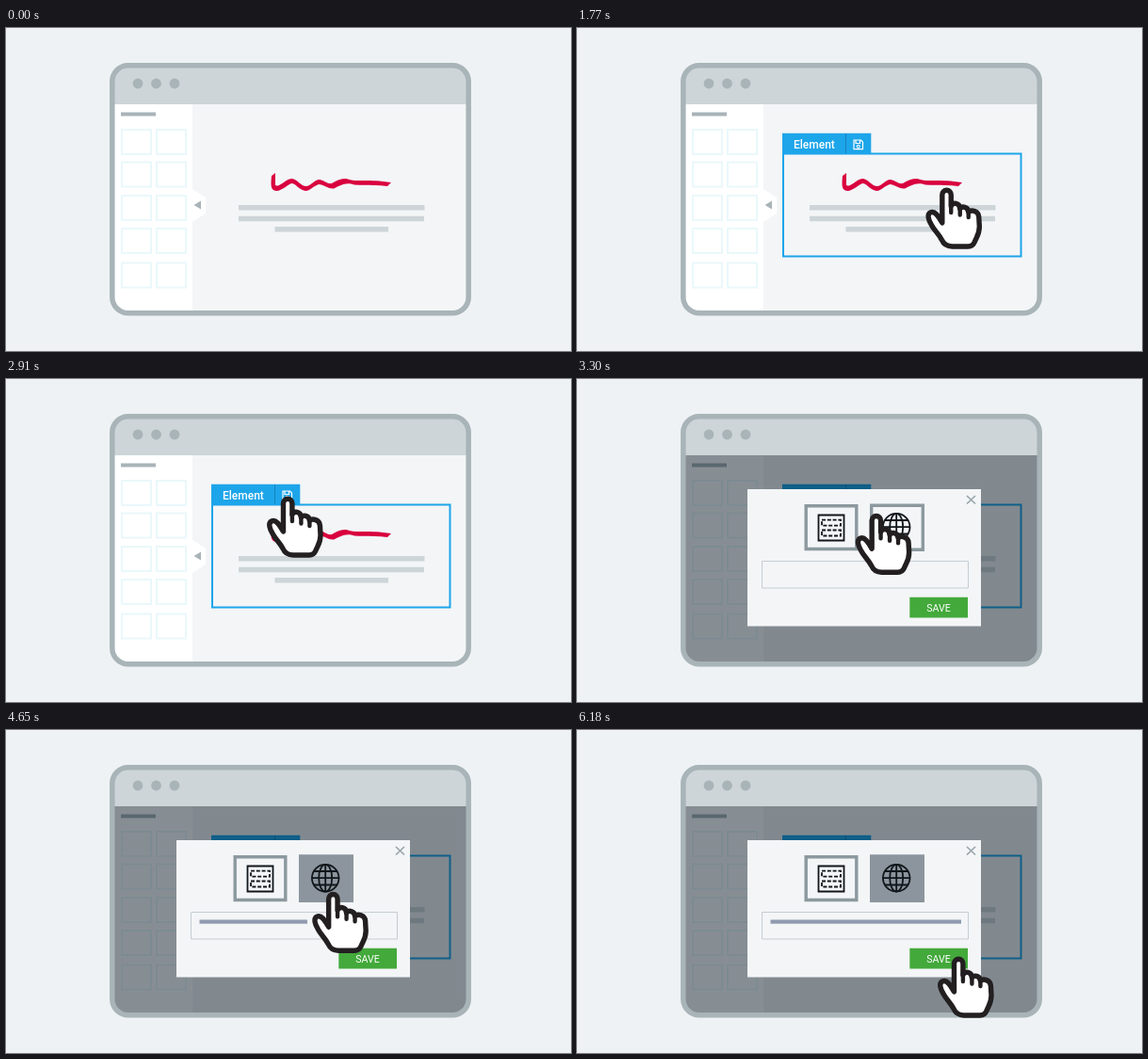
An HTML page for the animation above (6.63 s loop, 600 by 343 pixels).

```html
<!DOCTYPE html>
<html lang="en">
<head>
<meta charset="utf-8">
<title>Save element</title>
<style>
  html, body { margin: 0; height: 100%; overflow: hidden; background: #eef2f4; }
  svg { display: block; width: 600px; height: 343px; }
  text { font-family: Roboto, sans-serif; fill: #fff; }
</style>
</head>
<body>
<svg viewBox="0 0 600 343" fill="none">
  <defs>
    <clipPath id="inside"><rect x="113" y="40" width="378" height="262.500" rx="16"/></clipPath>
  </defs>

  <g clip-path="url(#inside)">
    <path fill="#f3f5f7" d="M110 81h384v224H110z"/>
    <path fill="#cdd5d8" d="M110 37h384v44H110z"/>
    <path fill="#fff" d="M110 81h88v90l14 9v17l-14 9v99h-88z"/>
    <path fill="#a8b4b8" d="M122 89.500h37v4h-37zM199.500 188l7.500-4.500v9z"/>
    <g id="tiles" stroke="#eaf8fb" stroke-width="2"></g>

    <path fill="#cdd5d8" d="M247 188h197.500v5.500H247zM247 199.700h197v5.500H247zM285.500 211h120.500v5.500H285.500z"/>
    <path fill="#d9003f" d="M282 157L286 154V164Q285 169 290 167C296 164 298 160 304 160C310 161 313 168 319 168C325 167 327 161 333 161C339 162 341 166 346 165C352 162 356 159 363 160.500C372 164 380 160 409 164L405 168C390 166 380 167 370 166.500C360 163 354 168 348 170.500C341 171 338 166 332 166C326 168 323 173 318 173C311 172 308 165 303 165C298 167 294 172 288 173C281 173 281 168 282 157Z"/>

    <g id="selection">
      <rect x="219" y="133.500" width="252.500" height="109" stroke="#1da5ea" stroke-width="2"/>
      <path fill="#1da5ea" d="M218 111.800h94.300v22H218z"/>
      <path stroke="#1583bd" d="M285.500 112v21"/>
      <text x="230" y="128" font-size="12" font-weight="500">Element</text>
      <path stroke="#fff" stroke-width="1.200" d="M294 119h7.500l2 2v7.700h-9.500zM296 119v3.500h4.500V119"/>
      <circle cx="298.700" cy="125.700" r="1.500" stroke="#fff" stroke-width="1.100"/>
    </g>

    <path id="shade" fill="#02101a" fill-opacity=".47" d="M110 81h384v224H110z"/>
  </g>

  <rect x="112.800" y="39.800" width="378.400" height="262.900" rx="17" stroke="#a8b4b8" stroke-width="5.500"/>
  <g fill="#a8b4b8">
    <circle cx="140" cy="59" r="5.400"/><circle cx="159.500" cy="59" r="5.400"/><circle cx="179" cy="59" r="5.400"/>
  </g>

  <g id="dialog">
    <path fill="#f3f5f7" d="M181 117h248v145.500H181z"/>
    <path stroke="#98a5ab" stroke-width="1.700" d="M414 124l9 8.500M423 124l-9 8.500"/>
    <g stroke="#8c999f" stroke-width="3.400">
      <path d="M243.200 134.700h53.600v45.800h-53.600z"/>
      <path d="M312.700 134.200h54.600v47h-54.600z"/>
    </g>
    <path id="picked" fill="#8c959d" d="M311 132.500h58v50.500h-58z"/>
    <g stroke="#10161a" stroke-width="1.800">
      <path d="M256.500 144.500h27v27h-27z"/>
      <path stroke-dasharray="4 1.800" d="M260 149.700h20v6h-20zM260 160.500h20v6h-20z"/>
      <circle cx="339.200" cy="157.200" r="14.300"/>
      <ellipse cx="339.200" cy="157.200" rx="7" ry="14.300"/>
      <path d="M339.200 143v28.500M325 157.200h28.500M327 150h24.500M327 164.500h24.500"/>
    </g>
    <path stroke="#c5cdd2" d="M196.500 193.500h219V222h-219z"/>
    <rect id="typed" x="205.500" y="201.500" height="4.200" fill="#909bb0"/>
    <path fill="#43a93b" d="M353.300 231.800H415v21.700h-61.700z"/>
    <text x="371.300" y="246.500" font-size="10.600">SAVE</text>
  </g>

  <g id="hand" stroke="#231f20" stroke-width="5.400" stroke-linejoin="round" stroke-linecap="round">
    <path fill="#fff" d="M17.500 38V8a4.700 4.700 0 0 1 9.400 0V20c2-4 9-4 9.500 3c2-3 8.500-2.500 9 3.500c3-3 10.600-1 11 5L57 42C57 50 54 53 52 58Q50 63 45 63H28Q20 63 17 56C14 50 9 46 6 40C3 35 1 29 5 27C10 24.500 14 32 17.500 38Z"/>
    <path stroke-width="4.400" d="M26.900 19v8M36.400 23v6.500M45.400 27v5"/>
  </g>
</svg>

<script>
const LOOP = 6630, STEP = 30;
const $ = id => document.getElementById(id);

$('tiles').innerHTML = [108, 142.5, 178, 213, 249.5].map(y =>
  [123, 160].map(x => `<rect x="${x}" y="${y}" width="31" height="26"/>`).join('')).join('');

const ramp = (t, from, to) => Math.min(1, Math.max(0, (t - from) / (to - from)));
const ease = p => (1 - Math.cos(Math.PI * p)) / 2;

// Pointer moves: start time, end time, destination
const start = [502, 255];
const moves = [
  [270, 1080, 412, 189],
  [1500, 2220, 277, 124],
  [2940, 3780, 325, 171],
  [4620, 5520, 383, 240],
];

function handAt(t) {
  let [x, y] = start;
  for (const [from, to, nextX, nextY] of moves) {
    const p = ease(ramp(t, from, to));
    x += (nextX - x) * p;
    y += (nextY - y) * p;
  }
  return [x, y];
}

const fade = (id, t, from, to) => $(id).setAttribute('opacity', ramp(t, from, to));

function draw(t) {
  fade('selection', t, 270, 600);
  fade('hand', t, 300, 960);
  fade('shade', t, 2910, 3240);
  fade('dialog', t, 2910, 3240);
  fade('picked', t, 3690, 3900);
  $('typed').setAttribute('width', 202.5 * ease(ramp(t, 4260, 4980)));
  $('hand').setAttribute('transform', `translate(${handAt(t)})`);
}

function tick() {
  draw(Math.floor(performance.now() % LOOP / STEP) * STEP);
  requestAnimationFrame(tick);
}
tick();
</script>
</body>
</html>
```
